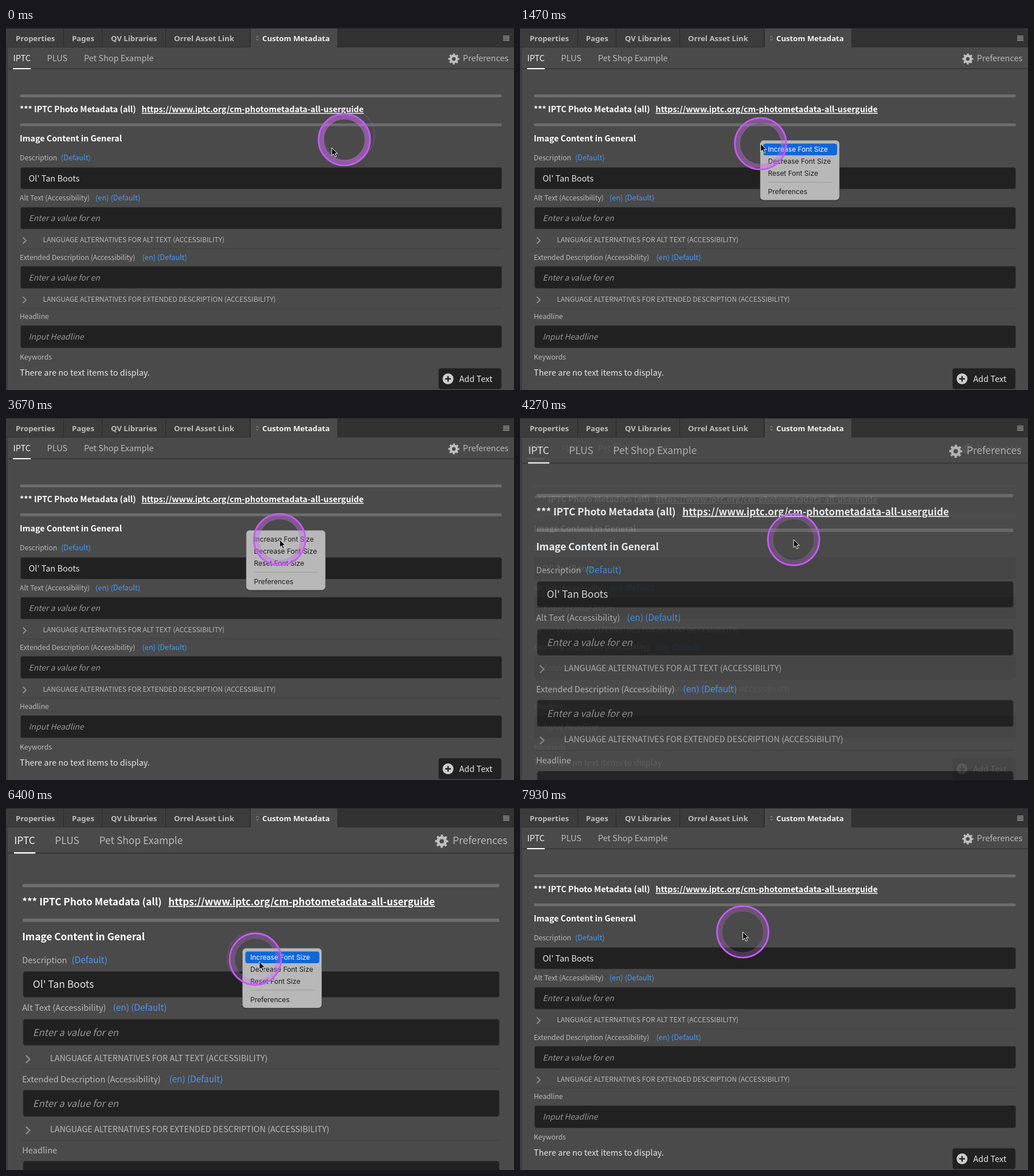
Animation, 886 px wide and 632 px high, one loop 8 s. Source, as an HTML page:

```html
<!DOCTYPE html>
<html lang="en">
<head>
<meta charset="utf-8">
<title>Custom Metadata panel</title>
<style>
  html, body { margin: 0; width: 100%; height: 100%; overflow: hidden; background: #4a4a4a; }
  svg { display: block; width: 886px; height: 632px; }
  text { white-space: pre; }
  .tab { font: 700 13.2px "Noto Sans", "Open Sans", sans-serif; fill: #bdbdbd; }
  .panel text { font: 14.5px "Noto Sans CJK JP", "Noto Sans CJK SC", "Noto Sans CJK", "Open Sans", sans-serif; fill: #b9b9b9; }
  .panel .bright { fill: #f2f2f2; }
  .panel .head { font-size: 14.3px; font-weight: 700; fill: #fff; }
  .panel .link { text-decoration: underline; }
  .panel .label { font-size: 12.2px; }
  .panel .lang { font-size: 12.8px; fill: #4599f7; }
  .panel .caps { font-size: 12px; }
  .panel .hint { font-size: 13.9px; font-style: italic; fill: #979797; }
  .panel .value { fill: #e6e6e6; }
  .field { fill: #212121; stroke: #363636; stroke-width: .8; }
  .rule { fill: #6d6d6d; }
  .menu text { font: 12px Inter, "Liberation Sans", sans-serif; fill: #1c1c1c; }
  .menu text.on { fill: #fff; }
</style>
</head>
<body>
<svg id="stage" viewBox="0 0 886 632"></svg>
<script>
const stage = document.getElementById('stage');

const label = (x, y, str, cls = '') => `<text x="${x}" y="${y}" class="${cls}">${str}</text>`;
const box = (x, y, w, h, attrs) => `<rect x="${x}" y="${y}" width="${w}" height="${h}" ${attrs}/>`;

function tabStrip() {
  const tabs = [[17, 'Properties'], [115, 'Pages'], [183, 'QV Libraries'], [293, 'Orrel Asset Link']];
  return box(0, 0, 886, 34, 'fill="#323232"') +
    box(0, 1, 426, 32, 'fill="#3c3c3c"') +
    box(427, 1, 151, 33, 'fill="#4a4a4a"') +
    [100, 167, 278, 425, 578].map(x => box(x, 1, 1, 32, 'fill="#2b2b2b"')).join('') +
    box(0, 0, 886, 1, 'fill="#272727"') +
    tabs.map(([x, name]) => label(x, 23, name, 'tab')).join('') +
    '<path d="M436.500 16.500l2-2.500 2 2.500M436.500 19l2 2.500 2-2.500" fill="none" stroke="#9a9a9a"/>' +
    '<text x="447" y="23" class="tab" style="fill:#f4f4f4">Custom Metadata</text>' +
    [13.5, 16, 18.5, 21].map(y => box(867, y, 11, 1.2, 'fill="#a8a8a8"')).join('');
}

// Coordinates are those of the normal font size; the right edge moves in when scaled.
function panel(scale) {
  const edge = 3 + 883 / scale;
  const fromRight = x => edge - (886 - x);
  const wide = fromRight(864.5) - 25;
  const rule = y => box(24.5, y, wide + .5, 5, 'rx="1.5" class="rule"');
  const field = (y, h, str, cls) =>
    box(25.5, y, wide - .5, h, 'rx="3" class="field"') + label(39.5, y + h / 2 + 5.3, str, cls);
  const expander = (y, str) =>
    `<path d="M29.500 ${y - 8.500}l5.500 5.500-5.500 5.500" fill="none" stroke="#8c8c8c" stroke-width="2"/>` +
    label(64.5, y, str, 'caps') + box(24, y + 11, wide + 1, 1, 'fill="#404040"');
  const gearX = fromRight(781);

  return `<g class="panel" transform="translate(3 34) scale(${scale}) translate(-3 -34)">` +
    box(3, 34, 884, 600, 'fill="#4a4a4a"') +
    box(3, 70.5, 884, 1.5, 'fill="#343434"') + box(12.2, 70, 31, 2, 'fill="#fff"') +
    label(12.4, 58.3, 'IPTC', 'bright') + label(71.6, 58.3, 'PLUS') + label(135.9, 58.3, 'Pet Shop Example') +
    `<g fill="none" stroke="#c0c0c0"><circle cx="${gearX}" cy="54" r="5.300" stroke-width="4.200"/>` +
    `<circle cx="${gearX}" cy="54" r="8" stroke-width="3.200" stroke-dasharray="3.142" stroke-dashoffset="1.571"/></g>` +
    label(fromRight(796.8), 58.3, 'Preferences') +
    rule(116) + label(24, 147.3, '*** IPTC Photo Metadata (all)', 'head') +
    label(236.5, 147.3, 'https://www.iptc.org/cm-photometadata-all-userguide', 'head link') +
    rule(166.5) + label(24, 198, 'Image Content in General', 'head') +
    label(24, 231.3, 'Description', 'label') + label(96, 231.3, '(Default)', 'label lang') +
    field(243.5, 37.5, "Ol' Tan Boots", 'value') +
    label(24, 301, 'Alt Text (Accessibility)', 'label') + label(156, 301, '(en) (Default)', 'label lang') +
    field(313, 38, 'Enter a value for en', 'hint') +
    expander(374, 'LANGUAGE ALTERNATIVES FOR ALT TEXT (ACCESSIBILITY)') +
    label(24, 404.8, 'Extended Description (Accessibility)', 'label') + label(237.5, 404.8, '(en) (Default)', 'label lang') +
    field(416, 38.5, 'Enter a value for en', 'hint') +
    expander(477.7, 'LANGUAGE ALTERNATIVES FOR EXTENDED DESCRIPTION (ACCESSIBILITY)') +
    label(24, 508, 'Headline', 'label') +
    field(519.5, 39, 'Input Headline', 'hint') +
    label(24, 578.5, 'Keywords', 'label') + label(24, 607, 'There are no text items to display.', 'value') +
    box(fromRight(754.5), 594, 109.5, 36.5, 'rx="4" class="field"') +
    `<circle cx="${fromRight(771)}" cy="612.500" r="9.500" fill="#cdcdcd"/>` +
    `<path d="M${fromRight(771) - 5} 612.500h10m-5-5v10" stroke="#222" stroke-width="2.400"/>` +
    label(fromRight(790.5), 618, 'Add Text', 'value') + '</g>';
}

const rowTops = [5.5, 26.5, 47.5, 79];
const menuMarkup = '<g id="menu" class="menu">' +
  box(-1, 1, 140, 105, 'rx="7" fill="#000" opacity=".25"') +
  box(0, 0, 138, 104, 'rx="6" fill="#b8b8b8" stroke="#8b8b8b" stroke-width=".6"') +
  box(5, 5.5, 129, 20.5, 'id="highlight" rx="4" fill="#1166d8"') +
  box(13.5, 72.5, 111, 1, 'fill="#9c9c9c"') +
  ['Increase Font Size', 'Decrease Font Size', 'Reset Font Size', 'Preferences']
    .map((name, i) => label(13.5, rowTops[i] + 14.5, name)).join('') + '</g>';

const ringMarkup = '<circle r="44.900" fill="none" stroke="#c45df3" stroke-width="2.800"/>';
stage.innerHTML = panel(1) + `<g id="large">${panel(1.2)}</g>` +
  box(0, 34, 2, 598, 'fill="#414141"') + box(2, 34, 1, 598, 'fill="#363636"') + tabStrip() + menuMarkup +
  `<g id="ghost" opacity=".15">${ringMarkup}</g>` +
  `<g id="ring"><circle id="band" r="39.700" fill="none" stroke="#c66be8" stroke-width="8.500"/>${ringMarkup}</g>` +
  `<g id="cursor"><path id="arrow" d="M0 0v14l3.300-3 2.300 5.300 2.500-1.100-2.300-5.100h4.300z" fill="#111" stroke="#f4f4f4"/>` +
  `<g id="beam" fill="none" transform="translate(2 .5)">` +
  ['#e8e8e8" stroke-width="3', '#181818" stroke-width="1.100'].map(s =>
    `<path d="M-3-6.500q3 0 3 2.500q0-2.500 3-2.500M0-4.500V4.500M-2 0h4M-3 6.500q3 0 3-2.500q0 2.500 3 2.500" stroke="${s}"/>`).join('') +
  '</g></g>';

const el = Object.fromEntries(['large', 'menu', 'highlight', 'ghost', 'ring', 'band', 'cursor', 'arrow', 'beam']
  .map(id => [id, document.getElementById(id)]));
const menuTexts = [...el.menu.querySelectorAll('text')];

// time, x, y, optional starting slope
const pointerPath = [
  [-140, 598, 187, 1], [-90, 590, 195, 1], [0, 568, 209, .8], [510, 415, 234],
  [800, 415, 234], [1180, 419.5, 202], [1860, 419.5, 202], [2400, 505, 254], [2640, 527, 249],
  [2720, 527, 249], [3180, 477.2, 212.2], [4590, 477.2, 212.2], [5060, 408, 252], [5230, 413.2, 250.3],
  [5930, 413.2, 250.3], [6600, 449.5, 273], [7530, 449.5, 273], [7740, 385, 214], [7830, 388.5, 216.2]
];
const bandTrack = [[0, .55], [330, .28], [1200, .28], [1400, .42], [1930, .42], [2130, .28],
  [3530, .28], [3660, .45], [4070, .28], [5200, .28], [5400, .52], [5470, .52], [5730, .28],
  [6600, .28], [6730, .48], [7070, .28]];
const largeTrack = [[4200, 0], [4266, .88], [4330, 1], [7270, 1], [7330, 0]];
const menus = [
  { x: 419, y: 196.3, open: 1270, close: 3800, blink: [3590, 3730] },
  { x: 412.5, y: 245, open: 5270, close: 6820, blink: [6710, 6790] }
];

const clamp = v => Math.max(0, Math.min(1, v));

function segment(keys, t) {
  let i = 0;
  while (i < keys.length - 2 && t >= keys[i + 1][0]) i++;
  const [a, b] = [keys[i], keys[i + 1]];
  return [a, b, clamp((t - a[0]) / (b[0] - a[0]))];
}

function track(keys, t) {
  const [a, b, u] = segment(keys, t);
  return a[1] + (b[1] - a[1]) * u;
}

function pointer(t) {
  const [a, b, u] = segment(pointerPath, t);
  const e = (a[3] || 0) * u * (1 - u) * (1 - u) + u * u * (3 - 2 * u);
  return [a[1] + (b[1] - a[1]) * e, a[2] + (b[2] - a[2]) * e];
}

const place = (node, [x, y]) => node.setAttribute('transform', `translate(${x.toFixed(2)} ${y.toFixed(2)})`);
const show = (node, on) => node.setAttribute('visibility', on ? 'visible' : 'hidden');

function drawMenu(t, tipY) {
  const menu = menus[t < 4500 ? 0 : 1];
  place(el.menu, [menu.x, menu.y]);
  el.menu.setAttribute('opacity', clamp((t - menu.open) / 66) * (1 - clamp((t - menu.close) / 220)));
  const row = Math.max(0, Math.min(3, Math.floor((tipY - menu.y - 5) / 21)));
  const lit = t > menu.open + 100 && !(t > menu.blink[0] && t < menu.blink[1]);
  el.highlight.setAttribute('y', rowTops[row]);
  el.highlight.setAttribute('opacity', lit ? 1 : 0);
  menuTexts.forEach((node, i) => node.classList.toggle('on', lit && i === row));
}

function draw(time) {
  const t = Math.floor((time % 8000 + 4) * .015) / .015 % 8000;
  const tip = pointer(t), ring = pointer(t - 90), trail = pointer(t - 140);
  place(el.cursor, tip);
  place(el.ring, ring);
  place(el.ghost, trail);
  show(el.ghost, Math.hypot(ring[0] - trail[0], ring[1] - trail[1]) > 4);
  const overText = t > 7050 && t < 7640;
  show(el.beam, overText);
  show(el.arrow, !overText);
  el.band.setAttribute('opacity', track(bandTrack, t));
  el.large.setAttribute('opacity', track(largeTrack, t));
  drawMenu(t, tip[1]);
}

const start = performance.now();
function tick() {
  draw(performance.now() - start);
  requestAnimationFrame(tick);
}
tick();
</script>
</body>
</html>
```
